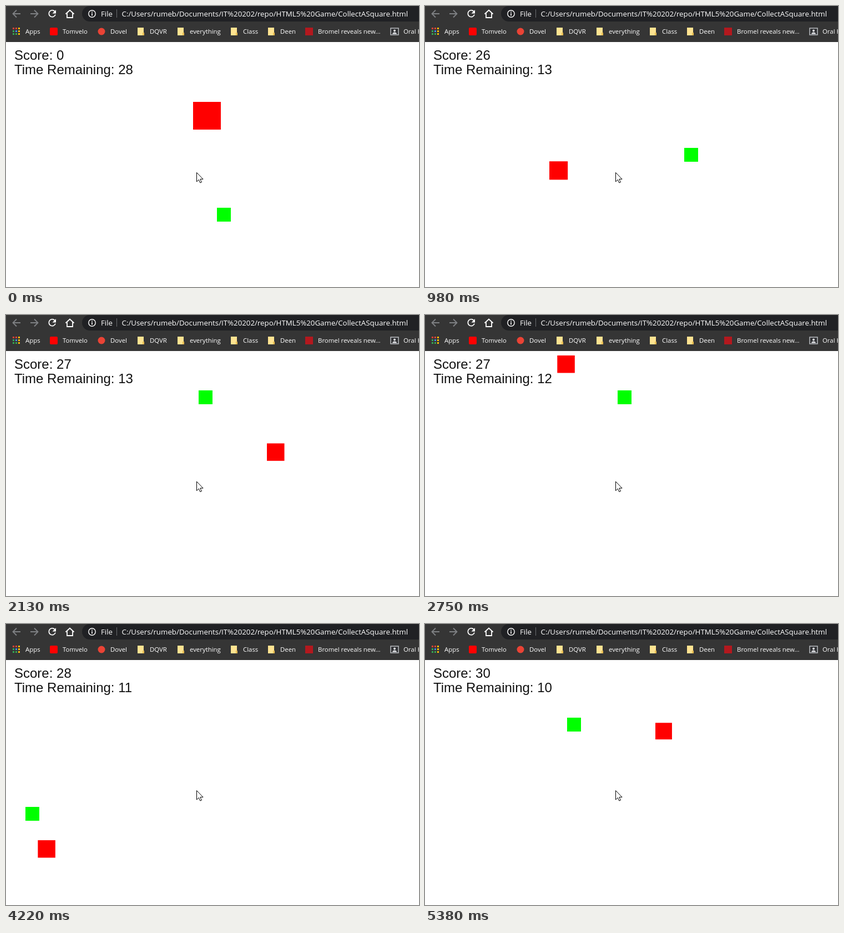
Recreate the animation shown at these times as an HTML page. Size 744 by 507 pixels, loop 5460 ms.

```html
<!DOCTYPE html>
<html lang="en">
<head>
<meta charset="utf-8">
<title>Collect a Square</title>
<style>
  html, body { margin: 0; width: 100%; height: 100%; overflow: hidden; background: #fff; }
  svg { display: block; }
  .bar { font: 11.4px "Open Sans", "Noto Sans", sans-serif; fill: #fff; }
  .url { font-size: 13.3px; }
  .hud { font: 24px "Liberation Sans", Arial, sans-serif; fill: #111; }
  .line { fill: none; stroke: #fff; stroke-width: 1.8; }
  .dim { stroke: #7f8184; }
</style>
</head>
<body>
<svg width="744" height="507" viewBox="0 0 744 507">
  <defs>
    <g id="folder">
      <path d="M0 0h11v9h1v5H0z" fill="#ffe391"/>
      <path d="M9 9h3v5H9z" fill="#e9bd54"/>
    </g>
  </defs>

  <rect width="744" height="65" fill="#353535"/>
  <rect x="137" y="0" width="640" height="28" rx="14" fill="#202124"/>
  <path class="line dim" d="M26 14H13M19 7.5L12.5 14L19 20.5M44 14H57M51 7.5L57.5 14L51 20.5"/>
  <path class="line" d="M87.7 9.6A6 6 0 1 0 89 15.5"/>
  <path d="M90 7v6.5h-6.5z" fill="#fff"/>
  <path class="line" d="M107.5 14.5L115 7.5L122.500 14.5M110 13V21H120V13"/>
  <circle class="line" cx="155" cy="14" r="6.2" style="stroke-width:1.4"/>
  <path d="M154.2 10.3h1.6v1.6h-1.6zM154.2 13h1.6v4.5h-1.6z" fill="#fff"/>
  <rect x="199" y="6" width="1" height="15" fill="#6a6d71"/>
  <g class="bar url">
    <text x="171" y="19">File</text>
    <text x="208.5" y="19">C:/Users/rumeb/Documents/IT%20202/repo/HTML5%20Game/CollectASquare.html</text>
  </g>

  <g id="apps"></g>
  <rect x="79" y="39" width="14" height="14" rx="2" fill="#f00"/>
  <circle cx="172" cy="46" r="6.5" fill="#ea4335"/>
  <rect x="539" y="39" width="14" height="14" fill="#b3181e"/>
  <use href="#folder" x="237" y="39"/>
  <use href="#folder" x="309" y="39"/>
  <use href="#folder" x="405" y="39"/>
  <use href="#folder" x="472" y="39"/>
  <rect x="693" y="40" width="14" height="12" fill="#303134" stroke="#b9bcc0" stroke-width="1.5"/>
  <path d="M696 50.5c0-4 8-4 8 0z" fill="#e8eaed"/>
  <circle cx="700" cy="44.5" r="2" fill="#e8eaed"/>
  <g class="bar">
    <text x="35" y="50">Apps</text>
    <text x="102" y="50">Tomvelo</text>
    <text x="188" y="50">Dovel</text>
    <text x="259" y="50">DQVR</text>
    <text x="331" y="50">everything</text>
    <text x="427" y="50">Class</text>
    <text x="494" y="50">Deen</text>
    <text x="562" y="50">Bromel reveals new...</text>
    <text x="716" y="50">Oral History</text>
  </g>

  <svg x="5" y="73" width="600" height="400" viewBox="5 73 600 400">
    <rect id="goal" width="25" height="25" fill="#0f0"/>
    <rect id="player" fill="#f00"/>
    <text class="hud" id="score" x="15" y="97"></text>
    <text class="hud" id="clock" x="15" y="123"></text>
  </svg>
  <path d="M343.5 300.5v16.5l3.8-3.6l2.5 5.6l2.6-1.1l-2.5-5.5h5.1z" fill="#fff" stroke="#000"/>
</svg>

<script>
const LOOP = 5460, STEPS = 71, CUT = 12;  // the game skips ahead at step CUT
const $ = id => document.getElementById(id);
const set = (el, attrs) => { for (const k in attrs) el.setAttribute(k, attrs[k]); };

// Player runs at even speed: first step, last step, path; it rests between runs
const runs = [
  [0, 9, 'M337 173H355V389'],
  [9, CUT, 'M355 389H50'],
  [CUT, 20, 'M224 240V408.8H319.7V351.3'],
  [20, 25, 'M319.7 351.3V73H528.8'],
  [25, 33, 'M528.8 73H470V441.5H414.5V344.5'],
  [33, 36, 'M414.5 344.5L238.3 73'],
  [36, 41, 'M238.3 73H160H179'],
  [41, 44, 'M179 73H335.5'],
  [46, 54, 'M335.5 73V441.5H5'],
  [54, 56, 'M5 441.5L55 396L85 321.5'],
  [58, 60, 'M85 321.5H5'],
  [61.8, 70, 'M5 321.5H558.5V178.3H415']
].map(([from, to, d]) => {
  const path = document.createElementNS('http://www.w3.org/2000/svg', 'path');
  path.setAttribute('d', d);
  return { from, to, path, length: path.getTotalLength() };
});

// Goals: step of appearance, x, y
const goals = [
  [0, 380, 364], [7, 0, 327], [CUT, 467, 256], [28, 347, 136],
  [47, 35, 330], [59, 408, 169], [70, 256, 169]
];

function draw() {
  const now = performance.now() % LOOP;
  const step = Math.min(STEPS - 1, Math.floor((now + 25) * STEPS / LOOP));
  const late = step >= CUT;

  const run = runs.findLast(r => r.from <= step);
  const done = Math.min(1, (step - run.from) / (run.to - run.from));
  const { x, y } = run.path.getPointAtLength(done * run.length);

  const n = goals.findLastIndex(g => g[0] <= step);
  const score = late ? n + 24 : n;
  const size = 50 * 0.95 ** Math.floor(score / 3);
  const seconds = late ? 14 - Math.max(1, Math.floor(step / 16.5)) : 28;

  set($('player'), { x, y, width: size, height: size });
  set($('goal'), { x: goals[n][1], y: goals[n][2] });
  $('score').textContent = 'Score: ' + score;
  $('clock').textContent = 'Time Remaining: ' + seconds;
  requestAnimationFrame(draw);
}

const [r, g, b, o] = ['#ea4335', '#34a853', '#4285f4', '#fbbc04'];
$('apps').innerHTML = [r, r, o, g, b, o, g, g, o].map((c, i) =>
  `<rect x="${12 + i % 3 * 5}" y="${39 + Math.floor(i / 3) * 5}" width="3" height="3" fill="${c}"/>`).join('');
draw();
</script>
</body>
</html>
```
